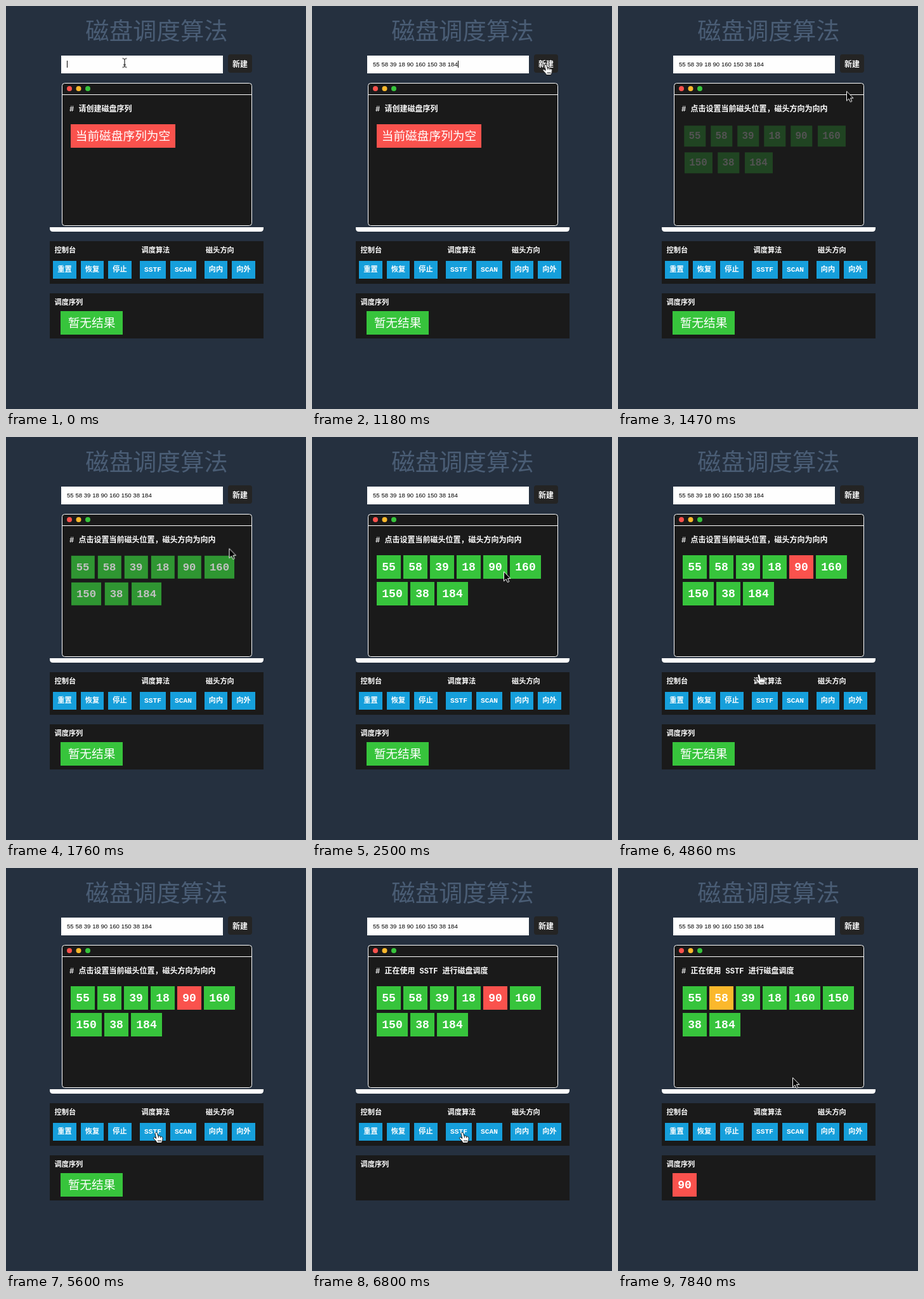
Write an HTML page that moves like this. It is 473 px wide and 634 px high and loops after 8 s.

```html
<!DOCTYPE html>
<html lang="zh-CN">
<head>
<meta charset="utf-8">
<title>磁盘调度算法</title>
<style>
html, body { margin: 0; width: 100%; height: 100%; overflow: hidden; background: #25303f; }
svg { display: block; width: 473px; height: 634px; }
text { font: bold 12px "Liberation Mono", "Noto Sans CJK SC", monospace; fill: #fff; white-space: pre; }
.mid { text-anchor: middle; }
.title { font-size: 37.4px; font-weight: 500; fill: #4a5d75; }
.label { font-size: 11.2px; }
.notice { font-size: 18.7px; font-weight: 500; }
.number { font-size: 18px; }
.typed { font: 9.65px "Liberation Sans", sans-serif; fill: #000; }
.panel { fill: #1a1a1a; }
.blue { fill: #169fdb; }
.green { fill: #37c43c; }
.red { fill: #fa524d; }
.yellow { fill: #fbb82c; }

/* Hard changes */
.cue { animation: 8s step-end infinite; }
.blank { animation-name: blank; }
.filled { animation-name: filled; }
.caret { animation-name: caret; }
.intro { animation-name: intro; }
.choose { animation-name: choose; }
.running { animation-name: running; }
.waiting { animation-name: waiting; }
.served { animation-name: served; }
@keyframes blank { 0% { visibility: visible } 1.75%, 100% { visibility: hidden } }
@keyframes filled { 0% { visibility: hidden } 1.75%, 100% { visibility: visible } }
@keyframes caret { 0% { visibility: hidden } 1.75% { visibility: visible } 16.5%, 100% { visibility: hidden } }
@keyframes intro { 0% { visibility: visible } 18.375%, 100% { visibility: hidden } }
@keyframes choose { 0% { visibility: hidden } 18.375% { visibility: visible } 85%, 100% { visibility: hidden } }
@keyframes running { 0% { visibility: hidden } 85%, 100% { visibility: visible } }
@keyframes waiting { 0% { visibility: visible } 85%, 100% { visibility: hidden } }
@keyframes served { 0% { visibility: hidden } 98%, 100% { visibility: visible } }

/* Tiles */
.tile { transform-box: fill-box; transform-origin: center; animation: appear 8s step-end infinite, reflow 8s step-end infinite; }
.head { animation-name: appear, leave; }
.head rect { animation: pick 8s step-end infinite; }
.next rect { animation: next 8s step-end infinite; }
@keyframes appear {
  0% { opacity: 0; scale: .88 }
  18.375% { opacity: .25; scale: .88 }
  20.25% { opacity: .5; scale: .92 }
  22% { opacity: .73; scale: .958 }
  23.875% { opacity: .9; scale: .985 }
  25.75%, 100% { opacity: 1; scale: 1 }
}
@keyframes reflow { 0% { translate: 0 0 } 98%, 100% { translate: var(--dx) var(--dy) } }
@keyframes leave { 0% { visibility: visible } 98%, 100% { visibility: hidden } }
@keyframes pick { 0% { fill: #37c43c } 46.125%, 100% { fill: #fa524d } }
@keyframes next { 0% { fill: #37c43c } 98%, 100% { fill: #fbb82c } }

/* Pointer */
.pointer { animation: travel 8s infinite; }
@keyframes travel {
  0% { transform: translate(187px, 89.5px); animation-timing-function: step-end }
  5.5% { transform: translate(187px, 89.5px); animation-timing-function: steps(4, start) }
  12.875% { transform: translate(366px, 84px); animation-timing-function: steps(2, start) }
  16.5% { transform: translate(368.5px, 92px); animation-timing-function: step-end }
  18.375% { transform: translate(368.5px, 92px); animation-timing-function: steps(3, start) }
  23.875% { transform: translate(343px, 216px); animation-timing-function: steps(4, start) }
  31.25% { transform: translate(310px, 222px); animation-timing-function: step-start }
  33.125% { transform: translate(302px, 211px); animation-timing-function: steps(2, start) }
  36.75% { transform: translate(286px, 205px); animation-timing-function: step-start }
  49.75% { transform: translate(291px, 201px); animation-timing-function: steps(7, start) }
  62.625% { transform: translate(210.5px, 402px); animation-timing-function: step-start }
  64.5% { transform: translate(199px, 412px); animation-timing-function: steps(3, start) }
  70% { transform: translate(237px, 421px); animation-timing-function: step-start }
  88.75% { transform: translate(237px, 416px); animation-timing-function: steps(3, start) }
  94.25%, 100% { transform: translate(275px, 329px) }
}
.beam { animation-name: beam; }
.hand { animation-name: hand; }
.arrow { animation-name: arrow; }
@keyframes beam { 0% { visibility: visible } 11%, 100% { visibility: hidden } }
@keyframes hand {
  0%, 18.375%, 62.625%, 88.75%, 100% { visibility: hidden }
  11%, 60.75%, 64.5% { visibility: visible }
}
@keyframes arrow {
  0%, 60.75%, 64.5% { visibility: hidden }
  18.375%, 62.625%, 88.75%, 100% { visibility: visible }
}
</style>
</head>
<body>
<svg viewBox="0 0 473 634">
  <text class="title mid" x="237.5" y="52.5">磁盘调度算法</text>

  <rect x="87" y="78" width="255" height="28" fill="#fefefe"/>
  <path class="cue blank" d="M96.5 86V97" stroke="#000"/>
  <text class="typed cue filled" x="96" y="95">55 58 39 18 90 160 150 38 184</text>
  <path class="cue caret" d="M230.5 86V97" stroke="#000"/>
  <rect x="350" y="76" width="38" height="29" rx="4" fill="#242424"/>
  <text class="mid" x="369" y="95.5">新建</text>

  <rect class="panel" x="88.5" y="121.5" width="299" height="224" rx="4" stroke="#fff"/>
  <path d="M89 139.5H387" stroke="#fff"/>
  <circle class="red" cx="100" cy="130" r="4"/>
  <circle class="yellow" cx="114.5" cy="130" r="4"/>
  <circle class="green" cx="129" cy="130" r="4"/>
  <path d="M69 348H406V350Q406 355 401 355H74Q69 355 69 350Z" fill="#fff"/>

  <text class="cue intro" x="100" y="166"># 请创建磁盘序列</text>
  <text class="cue choose" x="100" y="166"># 点击设置当前磁头位置，磁头方向为向内</text>
  <text class="cue running" x="100" y="166"># 正在使用 SSTF 进行磁盘调度</text>
  <g class="cue intro">
    <rect class="red" x="102" y="186" width="165" height="37"/>
    <text class="notice mid" x="184.5" y="210.5">当前磁盘序列为空</text>
  </g>
  <g id="tiles"></g>

  <rect class="panel" x="69" y="370" width="337" height="67"/>
  <text class="label" x="76.5" y="388.2">控制台</text>
  <text class="label" x="213.5" y="388.2">调度算法</text>
  <text class="label" x="315" y="388.2">磁头方向</text>
  <g id="buttons"></g>

  <rect class="panel" x="69" y="452" width="337" height="71"/>
  <text class="label" x="76.5" y="470.2">调度序列</text>
  <g class="cue waiting">
    <rect class="green" x="86" y="480" width="98" height="37"/>
    <text class="notice mid" x="135" y="504.5">暂无结果</text>
  </g>
  <g class="cue served">
    <rect class="red" x="86" y="480" width="38" height="37"/>
    <text class="number mid" x="105" y="504">90</text>
  </g>

  <g class="pointer">
    <path class="cue beam" d="M-3.5 -7Q0 -7 0 -5Q0 -7 3.5 -7M0 -5V5M-3.5 7Q0 7 0 5Q0 7 3.5 7M-2 3H2" fill="none" stroke="#000"/>
    <path class="cue hand" d="M-2 1.5C-1 -.5 1 -.5 1.5 1.5L3 6C5 4.8 6 5.3 6.3 6.6C7.6 5.8 8.6 6.4 8.8 7.4C10 7.2 10.2 8 10 9.5V11C10 13 8.8 14 8.5 16.5H1C.5 14 -2.5 12 -4.3 9.5C-5 8 -3.5 7 -2 8L-.2 9.5ZM3 6L3.6 8.5M6.3 6.6L6.6 8.8M3 12V14.5M5 12V14.5M7 12V14.5" fill="#fff" stroke="#000" stroke-width=".9"/>
    <path class="cue arrow" d="M.5 .8V15.8L4 12.6L6.4 17.6L8.8 16.5L6.5 11.6H11Z" fill="#000" stroke="#fff"/>
  </g>
</svg>
<script>
const byId = id => document.getElementById(id);

const box = (x, y, w, h, label, fill, type) =>
  `<rect class="${fill}" x="${x}" y="${y}" width="${w}" height="${h}"/>
   <text class="${type} mid" x="${x + w / 2}" y="${y + h / 2 + (type === 'number' ? 5.5 : 3.2)}">${label}</text>`;

// Number, left, top, later shift, role
const tiles = [
  [55, 102, 186, 0, 0], [58, 144, 186, 0, 0, 'next'], [39, 186, 186, 0, 0],
  [18, 228, 186, 0, 0], [90, 270, 186, 0, 0, 'head'], [160, 312, 186, -42, 0],
  [150, 102, 228, 221, -42], [38, 155, 228, -53, 0], [184, 197, 228, -53, 0]
];
byId('tiles').innerHTML = tiles.map(([n, x, y, dx, dy, role = '']) =>
  `<g class="tile ${role}" style="--dx:${dx}px;--dy:${dy}px">
   ${box(x, y, n > 99 ? 49 : 38, 37, n, 'green', 'number')}</g>`).join('');

const buttons = [
  ['重置', 74, 37], ['恢复', 118, 36], ['停止', 161, 37], ['SSTF', 211, 41],
  ['SCAN', 259, 41], ['向内', 313, 36], ['向外', 356, 37]
];
byId('buttons').innerHTML = buttons.map(([label, x, w]) =>
  box(x, 401, w, 28, label, 'blue', 'label')).join('');
</script>
</body>
</html>
```
